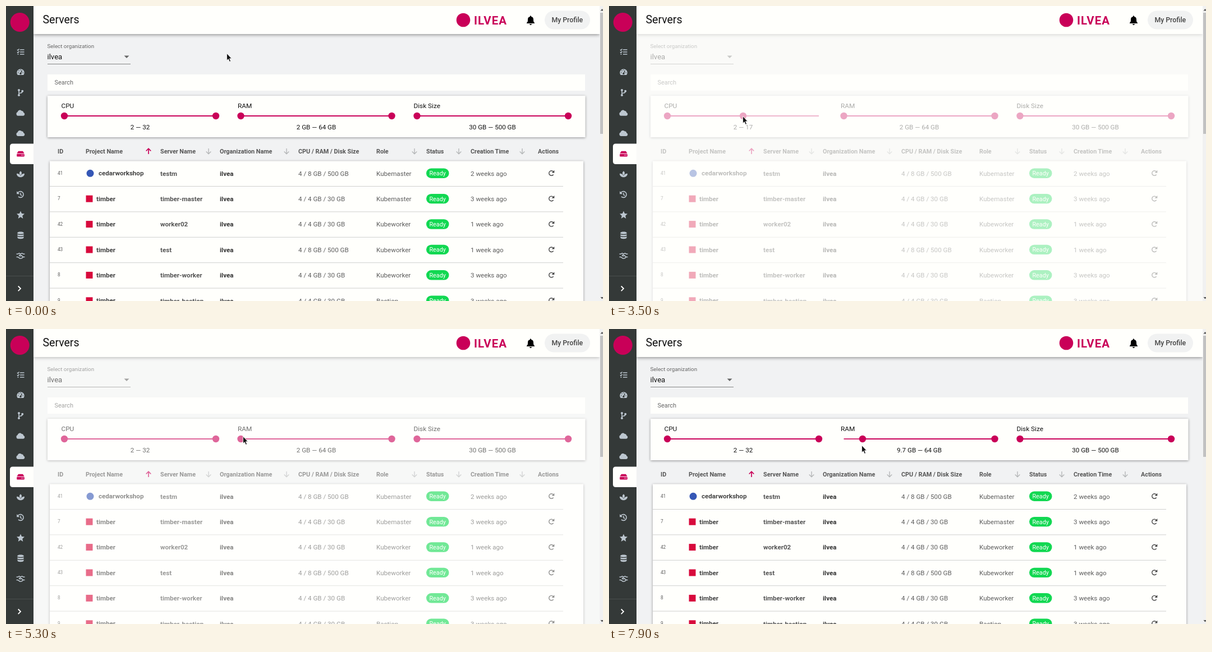
An HTML page for the animation above (8000 ms loop, 1064x526 px).

```html
<!DOCTYPE html>
<html lang="en">
<head>
<meta charset="utf-8">
<title>Servers</title>
<style>
  html, body { margin: 0; width: 100%; height: 100%; overflow: hidden; background: #f1f2f3; }
  svg { display: block; width: 1064px; height: 526px; font: 11.6px Roboto, Arial, sans-serif; fill: #111; }
  .white { fill: #fffffc; }
  .pink { fill: #c90058; }
  .card { fill: #fffffc; filter: drop-shadow(0 1px 2px #0006); }
  .bar { fill: #fffffc; filter: drop-shadow(0 1px 3px #0007); }
  .b { font-weight: 700; }
  .head { font-weight: 700; font-size: 10.8px; fill: #555; }
  .soft { fill: #5c5c5c; }
  .line { fill: none; stroke: currentColor; }
  .mid { text-anchor: middle; }
</style>
</head>
<body>
<svg id="stage" viewBox="0 0 1064 526"></svg>
<script>
const PINK = '#c90058';
const text = (x, y, s, attrs = '') => `<text x="${x}" y="${y}" ${attrs}>${s}</text>`;
const rect = (x, y, w, h, attrs = '') => `<rect x="${x}" y="${y}" width="${w}" height="${h}" ${attrs}/>`;
const path = (d, attrs = '') => `<path d="${d}" ${attrs}/>`;
const stroke = (d, width, color) => path(d, `fill="none" stroke="${color}" stroke-width="${width}"`);
const group = (x, y, body) => `<g transform="translate(${x} ${y})">${body}</g>`;
const dot = (x, y, r, attrs = '') => `<circle cx="${x}" cy="${y}" r="${r}" ${attrs}/>`;

// Table
const columns = [[92, 'ID'], [142, 'Project Name', 254], [275, 'Server Name', 361],
  [381, 'Organization Name', 500], [521, 'CPU / RAM / Disk Size'], [660, 'Role', 728],
  [749, 'Status', 807], [828, 'Creation Time', 920], [948, 'Actions']];
const rows = [
  [41, 'cedarworkshop', 'testm', '8 GB / 500', 'Kubemaster', '2 weeks'],
  [7, 'timber', 'timber-master', '4 GB / 30', 'Kubemaster', '3 weeks'],
  [42, 'timber', 'worker02', '4 GB / 30', 'Kubeworker', '1 week'],
  [43, 'timber', 'test', '8 GB / 500', 'Kubeworker', '1 week'],
  [8, 'timber', 'timber-worker', '4 GB / 30', 'Kubeworker', '3 weeks'],
  [9, 'timber', 'timber-bastion', '4 GB / 30', 'Bastion', '3 weeks']];

const header = ([x, label, sortX]) => {
  const up = label === 'Project Name';
  const arrow = sortX ? group(sortX, 259, `<g transform="scale(1 ${up ? -1 : 1})">` +
    stroke('M0-5V4.5M-4.3 .5L0 4.8L4.3 .5', up ? 1.7 : 1.4, up ? PINK : '#b5b7b8') + '</g>') : '';
  return text(x, 263, label, 'class="head"') + arrow;
};

const row = ([id, project, server, size, role, age], i) => {
  const first = i === 0;
  const soft = 'class="soft"';
  return group(0, 298.3 + 45.4 * i,
    text(92, 2.5, id, 'class="soft" font-size="8.2"') +
    (first ? dot(150, 0, 6.5, 'fill="#3557b5"') : rect(142.5, -6, 12, 12, 'fill="#d80a3c"')) +
    text(first ? 165 : 161, 4, project, 'class="b" fill="#444"') +
    text(275, 4.2, server, 'class="b" fill="#555"') +
    text(381, 4.2, 'ilvea', 'class="b" fill="#333"') +
    text(521, 4.2, `4 / ${size} GB`, soft) + text(660, 4.2, role, soft) +
    rect(749, -8.8, 40.5, 17.4, 'rx="8.7" fill="#12d852"') +
    text(769.2, 3.8, 'Ready', 'class="mid" font-size="10.8" fill="#fff"') +
    text(828, 4.2, age + ' ago', soft) +
    stroke('M975.6 2.2A4.3 4.3 0 1 1 975.2-3.2', 1.4, '#444') +
    path('M977.3-5.6V-.9H972.6Z', 'fill="#444"') +
    rect(78, 22.7, 915, 1, 'fill="#cfd0cf"'));
};

// Sliders: [left, right, label x, label, value centre]
const sliders = [[104, 374, 98.5, 'CPU', 239], [418.5, 687.5, 413, 'RAM', 553], [732.5, 1002, 726.5, 'Disk Size', 867]];
const slider = ([a, b, x, label, mid], i) =>
  text(x, 182, label, 'font-size="11.8"') + rect(a, 195.2, b - a, 1.6, 'class="pink"') +
  rect(a, 195, b - a, 2, `class="pink" id="track${i}"`) +
  dot(a, 196, 6.2, `class="pink" id="low${i}"`) + dot(b, 196, 6.2, `class="pink" id="high${i}"`) +
  text(mid, 220, '30 GB — 500 GB', `class="mid" id="value${i}"`);

// Sidebar icons, each centred on its own origin
const ICON = '#bcc6cf', DARK = '#343938';
const cloud = path('M-5 5A3.6 3.6 0 0 1-5.4-1.8A4.2 4.2 0 0 1 1.8-3.8A3 3 0 0 1 5.2-.8A3 3 0 0 1 5 5Z');
const icons = [
  stroke('M-6-3.8l1.3 1.3l2.2-2.6M-6 .4l1.3 1.3l2.2-2.6M-1-3.8H6.5M-1 .2H6.5M-1 4.2H6.5M-5.5 4.2h2', 1.5, ICON),
  path('M-5.2 5A6.7 6.7 0 1 1 5.2 5Z') + stroke('M0 2.5L2.5-3', 1.4, DARK) + dot(0, 2.5, 1.7, `fill="${DARK}"`) +
    [[-4, 1], [-3, -2.5], [0, -4], [4, 1]].map(p => dot(...p, .8, `fill="${DARK}"`)).join(''),
  stroke('M-3-4V5M-3 2C-3 0 3 2 3-2', 1.6, ICON) + dot(-3, -4.3, 2) + dot(-3, 4.6, 2) + dot(3.2, -2.7, 2),
  cloud, cloud,
  path('M-4-4.8H4L6.6-.6H-6.6Z', 'class="pink"') + rect(-6.8, .2, 13.6, 4.8, 'rx="1.2" class="pink"') +
    dot(2, 2.6, .8, 'fill="#fff"') + dot(4.5, 2.6, .8, 'fill="#fff"'),
  path('M0-5.5C2.5-3 3-1 0 2C-3-1-2.5-3 0-5.5ZM-7-1C-3-1-1 1 0 3C1 1 3-1 7-1C7 3 4 5.5 0 5.5C-4 5.5-7 3-7-1Z'),
  stroke('M-5-2.8A5.4 5.4 0 1 1-4 3.8M0-3V.5L2.5 2', 1.6, ICON) + path('M-6.8-6V-.8H-1.6Z'),
  path('M0-7L2-2.4L7-1.9L3.2 1.5L4.3 6.4L0 3.8L-4.3 6.4L-3.2 1.5L-7-1.9L-2-2.4Z'),
  path('M-5.5-4.5C-5.5-7 5.5-7 5.5-4.5V4.5C5.5 7-5.5 7-5.5 4.5Z') +
    stroke('M-5.5-2.8C-4-1 4-1 5.5-2.8M-5.5 1.2C-4 3 4 3 5.5 1.2', 1.1, DARK),
  stroke('M-7.5-3H-5L-2.5-4.3L0-3L2.5-4.3L5-3H7.5M-7.5 2.4H-5L-1 5L2 4.5L5 2.2H7.5M0-3L-2.5-.3Q-1 1.4 1-.6L5 2.4', 1.5, ICON)];

stage.innerHTML =
  rect(0, 0, 1064, 526, 'fill="#f1f2f3"') +
  rect(49, -5, 1009, 55, 'class="bar"') +
  text(73.5, 75, 'Select organization', 'font-size="9.8" fill="#666"') +
  text(73.5, 95, 'ilvea', 'font-size="13.1"') +
  path('M210.5 88.5h9l-4.5 4.6Z', 'fill="#666"') + rect(74, 103, 148, 1, 'fill="#858585"') +
  rect(74, 122, 958, 29, 'class="white"') +
  text(86.5, 140, 'Search', 'font-size="10.9" fill="#666"') +
  rect(74, 160, 958.5, 74, 'class="card"') + sliders.map(slider).join('') +
  columns.map(header).join('') +
  rect(78, 276.5, 951, 270, 'class="card"') + rows.map(row).join('') +
  rect(49, 50, 1009, 476, 'class="white" id="veil"') +
  // Top bar
  rect(49, 0, 1009, 50, 'class="white"') + text(65.5, 31, 'Servers', 'font-size="19.5"') +
  dot(815, 25, 12.3, 'class="pink"') +
  text(834, 32.5, 'ILVEA', 'class="b pink" font-size="20.5" letter-spacing="1.1"') +
  path('M928 31V30C930 28 930 27 930 24C930 21 931.5 19.6 934 19V17.5H936V19C938.5 19.6 940 21 940 24C940 27 940 28 942 30V31ZM933 32H937A2 2 0 0 1 933 32Z', 'fill="#000"') +
  rect(960, 8.5, 81, 33, 'rx="16.5" fill="#f1f2f2"') +
  text(1000.3, 29, 'My Profile', 'class="mid" font-size="12.3" font-weight="500" fill="#444"') +
  // Scrollbar
  rect(1058, 0, 6, 526, 'fill="#f1f1f1"') + rect(1059, 12, 5, 216, 'fill="#c1c1c1"') +
  path('M1059.5 8.5l2.8-3.5l2.8 3.5ZM1059.5 519l2.8 3.5l2.8-3.5Z', 'fill="#555"') +
  // Sidebar
  rect(0, 0, 49, 526, `fill="${DARK}"`) + dot(24.7, 29, 17, 'class="pink"') +
  path('M49 245.5H12Q7 245.5 7 250.5V277Q7 282 12 282H49Z', 'class="white"') +
  `<g fill="${ICON}">` + icons.map((icon, i) => group(26, 81.7 + 36.35 * i, icon)).join('') + '</g>' +
  rect(0, 481, 49, 1, 'fill="#4a4f4e"') + stroke('M21.7 499.5l4.3 4.3l-4.3 4.3', 1.8, '#fff') +
  `<g id="arrow">${path('M.5 .5V13.2L3.3 10.6L5.3 15.3L7.5 14.4L5.5 9.8H9.2Z', 'fill="#111" stroke="#fff" stroke-width=".8"')}</g>` +
  `<g id="hand">${path('M-3.5 6.5V4.5L-6 1.5V-1.2Q-5-2.2-3.5-1V-4.5Q-2.3-6.5-1-4.9Q.3-6.5 1.6-4.7Q3-6 4-4.3Q6-5 6 -3V2.5L4.6 4.8V6.5Z', 'class="white" stroke="#222" stroke-width="1.1"')}${stroke('M-1-4.5V-1.8M1.6-4.4V-1.8M4-4V-1.8', .8, '#222')}</g>`;

// Keyframes: [ms, value...]
const pointer = [[700, 393, 84], [800, 392, 122], [900, 392, 122], [1000, 389, 142], [1200, 378, 190],
  [1300, 378, 190], [1400, 379, 194], [1500, 379, 194], [1600, 378, 197], [1700, 371, 197], [2400, 296, 197],
  [2700, 251, 197], [2800, 251, 197], [2900, 243, 198], [3200, 243, 198], [3500, 238, 196], [3900, 238, 196],
  [4000, 242, 197], [4500, 366, 198], [4600, 366, 198], [4700, 386, 203], [4800, 386, 203], [5200, 418, 190],
  [5300, 422, 191], [5400, 422, 191], [5600, 428, 193], [6000, 428, 193], [6100, 428, 194], [6200, 428, 194],
  [6700, 416, 197], [6800, 416, 197], [6900, 420, 197], [7300, 453, 199], [7500, 450, 207]];
const cpu = [[1600, 32], [1700, 31], [2400, 23], [2700, 18], [2800, 18], [2900, 17], [3900, 17], [4500, 32]];
const ram = [[6900, 2], [7500, 9.9], [7800, 9.9], [7900, 9.7]];
const veilAlpha = [[3200, 0], [3500, .65], [3800, .65], [4100, 0], [5200, 0], [5300, .4], [5400, .4], [5600, 0]];
const drags = [[1600, 2900], [4000, 4700], [6900, 7400]];

function at(keys, t) {
  const next = keys.findIndex(k => k[0] > t);
  if (next < 1) return keys.at(next).slice(1);
  const a = keys[next - 1], b = keys[next], p = (t - a[0]) / (b[0] - a[0]);
  return a.slice(1).map((v, i) => v + (b[i + 1] - v) * p);
}

const el = id => document.getElementById(id);
function setSlider(i, low, high, min, max, unit) {
  const [a, b] = sliders[i];
  const pos = v => a + (b - a) * (v - min) / (max - min);
  el('low' + i).setAttribute('cx', pos(low));
  el('high' + i).setAttribute('cx', pos(high));
  el('track' + i).setAttribute('x', pos(low));
  el('track' + i).setAttribute('width', pos(high) - pos(low));
  el('value' + i).textContent = `${low}${unit} — ${high}${unit}`;
}

const start = performance.now();
function draw() {
  const t = Math.floor((performance.now() - start) % 8000 / 100) * 100;
  const [x, y] = at(pointer, t);
  const dragging = drags.some(([a, b]) => t >= a && t < b);
  for (const [id, on] of [['arrow', !dragging], ['hand', dragging]]) {
    el(id).setAttribute('transform', `translate(${Math.round(x)} ${Math.round(y)})`);
    el(id).setAttribute('visibility', on ? 'visible' : 'hidden');
  }
  setSlider(0, 2, Math.round(at(cpu, t)[0]), 2, 32, '');
  setSlider(1, +at(ram, t)[0].toFixed(1), 64, 2, 64, ' GB');
  el('veil').setAttribute('opacity', at(veilAlpha, t)[0]);
  requestAnimationFrame(draw);
}
draw();
</script>
</body>
</html>
```
